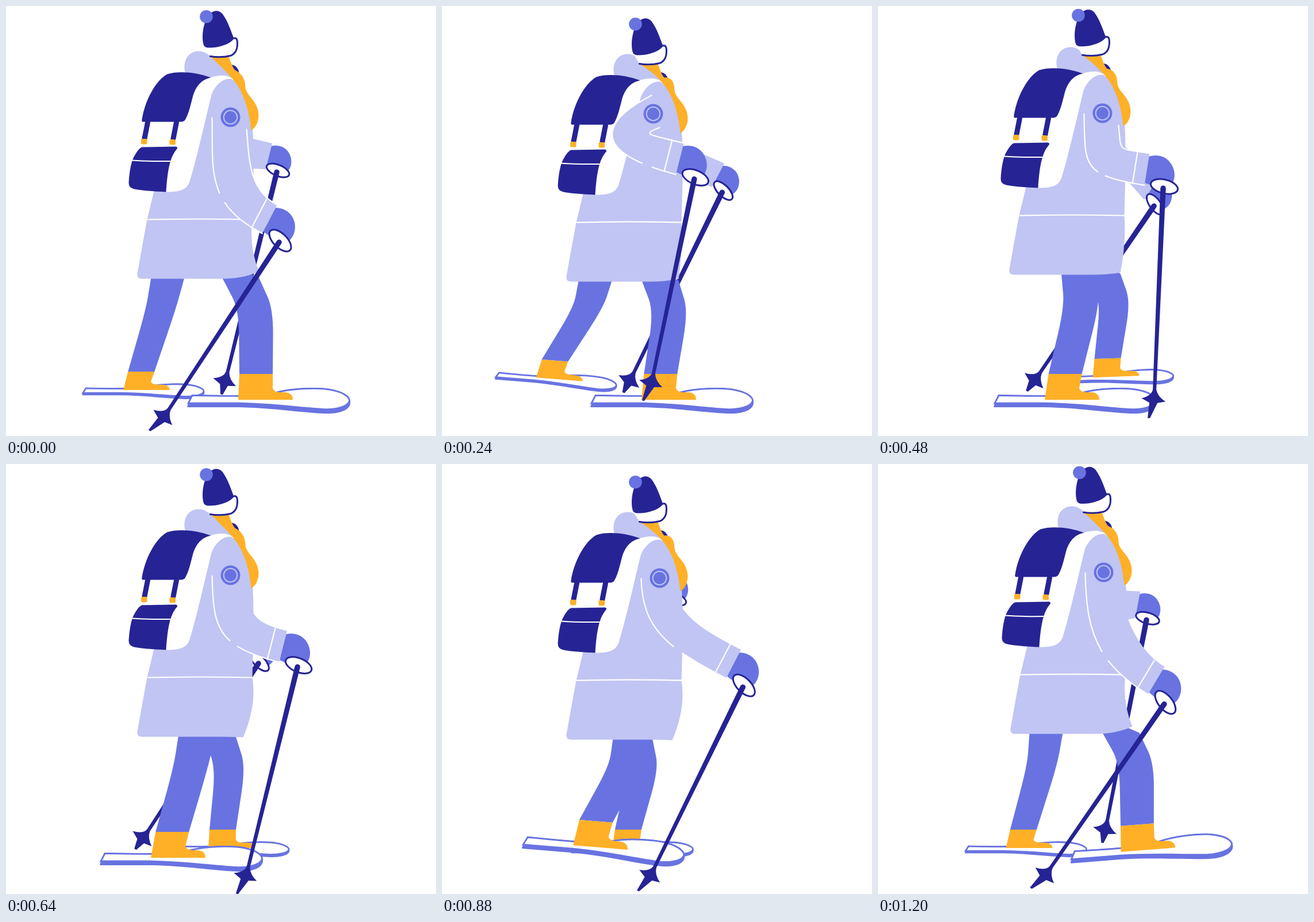
An HTML page for the animation above (1280 ms loop, 748x748 px).

```html
<!DOCTYPE html>
<html lang="en">
<head>
<meta charset="utf-8">
<title>Winter hike</title>
<style>
html, body { margin: 0; width: 100%; height: 100%; overflow: hidden; background: #fff; }
svg { display: block; width: 100vw; height: 100vh; }
</style>
</head>
<body>
<svg id="stage" viewBox="0 0 748 748"></svg>
<script>
const STEP = 80, STEPS = 16, STANCE = 9, SWING = STEPS - STANCE;
const NAVY = '#262494', BLUE = '#6873e1', LILAC = '#c0c5f3', AMBER = '#ffb027', WHITE = '#fff';
const { PI, sin, cos, hypot, max, min } = Math;

// Both sides share one gait, half a cycle apart
const NEAR = {
  phase: 0, heel: [404, 685], stride: 19, kick: 55, hip: [.5, 206], hipW: 32, kneeW: 30,
  ski: '', boot: [58, 45, 95], shift: [0, 0], hand: 1, grip: 33, guard: [24, 12], spike: [-8, 48]
};
const FAR = {
  phase: 8, heel: [352, 668], stride: 18.5, kick: 71, hip: [.6, 159], hipW: 29, kneeW: 26,
  ski: 'translate(-5 1.5) scale(.75 .6)', boot: [46, 32, 81], shift: [-36, -64], hand: .83, grip: 20, guard: [21, 9.5], spike: [-1, 38]
};
// Grip of the pole at every second step
const GRIP = [[475, 411], [428, 328], [460, 288], [496, 317], [507, 353], [519, 378], [525, 397], [516, 412]];

const add = (a, b, f = 1) => [a[0] + b[0] * f, a[1] + b[1] * f];
const mix = (a, b, f) => [a[0] + (b[0] - a[0]) * f, a[1] + (b[1] - a[1]) * f];
const clamp = (v, lo, hi) => max(lo, min(hi, v));
const degrees = (x, y) => Math.atan2(y, x) * 180 / PI;
const polar = deg => [cos(deg * PI / 180), sin(deg * PI / 180)];

const fill = (d, color, extra = '') => `<path d="${d}" fill="${color}" ${extra}/>`;
const line = (d, color, width, extra = '') =>
  `<path d="${d}" fill="none" stroke="${color}" stroke-width="${width}" stroke-linecap="round" stroke-linejoin="round" ${extra}/>`;
const group = (transform, body) => `<g transform="${transform}">${body}</g>`;
const move = (p, body) => group(`translate(${p})`, body);

// Closed Catmull-Rom curve through evenly timed points
function loopCurve(points, t) {
  const n = points.length, i = Math.floor(t), f = t - i;
  const [a, b, c, d] = [-1, 0, 1, 2].map(j => points[(i + j + n) % n]);
  return [0, 1].map(m => b[m] + f / 2 * (c[m] - a[m] +
    f * (2 * a[m] - 5 * b[m] + 4 * c[m] - d[m] + f * (3 * (b[m] - c[m]) + d[m] - a[m]))));
}

function bodyPose(k) {
  const wave = peak => cos((k - peak) * PI / 4);
  const body = [-6.5 - 7 * wave(3), 7 * wave(2) - .5];
  return { body, head: add(body, [0, 4.7 + 4.7 * wave(4)]) };
}

// The foot slides back with the ground, then kicks forward in an arc
function footPose(kind, u) {
  const s = max(0, (u - STANCE) / SWING), lift = sin(PI * s);
  const [x0, y0] = kind.heel;
  const back = STANCE * kind.stride;
  const x = u < STANCE ? x0 - u * kind.stride : x0 - back * (1 - s) - kind.kick * sin(2 * PI * s);
  return {
    x, y: y0 - 30 * lift ** 1.3,
    tilt: 8 * (1 - s / 2) * sin(2 * PI * s ** 1.7),
    lean: 2 + 7 * (u < STANCE ? u / STANCE : 1 - s),
    hip: kind.hip[0] * x + kind.hip[1] + 12 * lift,
    bend: 18 - 15 * max(0, cos((u - 8.5) * PI / 7))
  };
}

// The pole end stays planted while the hand passes, then swings ahead
function polePose(kind, u) {
  const grip = add(loopCurve(GRIP, u / 2), kind.shift);
  const planted = (u + 8) % STEPS;
  let end = [421 - 17.3 * planted, 703];
  if (planted > STANCE) {
    const s = (planted - STANCE) / SWING;
    end = [265 + 156 * s + 140 * sin(PI * s ** 1.2) ** 2, 703 - 62 * sin(PI * s ** .6)];
  }
  const turn = 21 - 12 * cos((u - 5.5) * PI / 8);
  const v = polar(turn);
  const low = add(grip, v, -kind.grip);
  const high = add(low, [v[1], -v[0]], 56 * kind.hand);
  return { grip, end: add(end, kind.shift), turn, v, low, high };
}

const SKI =
  fill('M-89,12L-81,-9C-30,-8 40,-6 66,-14C95,-22 145,-23 165,-18C188,-13 196,-4 195,6C194,18 176,25 150,24C105,22 60,14 0,13L-88,13Z', BLUE) +
  fill('M-87,6L-80,-7.5C-30,-6.5 40,-4.5 67,-12.5C95,-20.5 145,-21.5 164.500,-16.5C186,-12 195,-3 193,3C190,12 170,17 150,16.5C105,14 60,7 0,6Z',
    WHITE, `stroke="${BLUE}" stroke-width="2.800" vector-effect="non-scaling-stroke"`);

function leg(foot, kind, hipY) {
  const { x, y, tilt, lean, hip, bend } = foot;
  const [w, h, len] = kind.boot;
  const [c, s] = polar(tilt);
  const ankle = lx => [x + lx * c + h * s, y + lx * s - h * c];
  const top = [hip, hipY];
  const knee = add(mix(top, ankle(lean + w / 2), .33), [bend, 0]);
  const side = (p, dx) => [p[0] + dx, p[1]];
  const edge = (a, k, b) => `L${a}L${mix(a, k, .6)}Q${k} ${mix(k, b, .4)}L${b}`;
  const trousers = `M${hip},${hipY - 14}` +
    edge(side(top, -kind.hipW), side(knee, -kind.kneeW), ankle(lean)) +
    edge(ankle(lean + w), side(knee, kind.kneeW), side(top, kind.hipW)) + 'Z';
  const q = h / 45;
  const boot = `M0,0L${lean},${-h}H${lean + w}L${w + 2},${-20 * q}Q${w + 4},${-14 * q} ${w + 14},${-13 * q}` +
    `L${len - 12},${-13 * q}Q${len},${-11 * q} ${len},0Z`;
  const at = `translate(${x} ${y}) rotate(${tilt})`;
  return group(at, group(kind.ski, SKI)) + fill(trousers, BLUE) + group(at, fill(boot, AMBER));
}

const glove = (p, kind) => group(`translate(${p.low}) rotate(${p.turn}) scale(${kind.hand})`,
  fill('M0,-4L-1,-50C12,-57 28,-56 38,-46C50,-35 52,-18 46,-8C38,1 20,0 0,-4Z', BLUE));

function pole({ grip, end, turn }, kind) {
  const [dx, dy] = add(end, grip, -1);
  const len = hypot(dx, dy), [px, py] = kind.spike;
  const guard = `<ellipse rx="${kind.guard[0]}" ry="${kind.guard[1]}" fill="#fff" stroke="${NAVY}" stroke-width="3"/>`;
  const shaft = `M-4.7,0A4.7,4.7 0 0 1 4.7,0L3,${len + 4}H-3Z`;
  const star = `M-3,-2Q-5,9 -22,14L-8,21L${px - 2},${py}H${px + 2}L6,21L20,18Q6,10 3,-2Z`;
  return group(`translate(${add(grip, [2, -3])}) rotate(${1.7 * turn - 2})`, guard) +
    group(`translate(${grip}) rotate(${degrees(dx, dy) - 90})`, fill(shaft, NAVY) + move([0, len], fill(star, NAVY)));
}

function farArm(p, body) {
  const sleeve = `M${add([400, 224], body)}L${p.high}L${p.low}L${add([410, 282], body)}Z`;
  return glove(p, FAR) + fill(sleeve, LILAC) + pole(p, FAR);
}

// 0 for an open arm, 1 when the elbow is drawn right back
const foldOf = (p, body) => clamp((445 + body[0] - p.low[0]) / 23, 0, 1);

function nearArm(p, body, fold, u) {
  const a = add(add([360, 195], body), [18, -44], fold);
  const f = add(add([420, 215], body), [-28, -8], fold);
  const back = `M${a}C${add(a, [2 - 96 * fold, 90 - 42 * fold])} ${add(p.low, p.v, -112 - 36 * fold)} ${p.low}`;
  const f1 = add(f, [5 - 40 * fold, 48 - 35 * fold]), f2 = add(p.high, p.v, -58);
  const sleeve = `${back}L${p.high}C${f2} ${f1} ${f}Z`;
  const cuff = `M${add(p.low, p.v, -21)}L${add(p.high, p.v, -21)}`;
  return glove(p, NEAR) + fill(sleeve, LILAC) +
    line(back, WHITE, 2.2, `pathLength="100" stroke-dasharray="${56 + 18 * fold} 8 100"`) +
    (u < 8 ? line(`M${f}C${f1} ${f2} ${p.high}`, WHITE, 2.2) : '') + line(cuff, WHITE, 2.2);
}

// The hem is pushed out by the leading hip
function coat(frontHip) {
  const x = clamp(frontHip, 414, 442), y = 476 - (x - 414) / 2;
  return fill(`M262,310L247,372Q238,420 230,466Q229,475 238,475H375Q${x - 27},475 ${x},${y}` +
    `Q${429 - (x - 432) / 2},420 430,372L432,300C432,235 434,190 416,150C404,130 388,121 372,126L330,150Z`, LILAC) +
    line('M248,372Q340,370 430,372', WHITE, 2.2);
}

const HOOD = fill('M313,116C308,92 322,78 338,79C356,80 372,103 396,126L388,136L330,128Z', LILAC);
const buckle = (x, y) => `<rect x="${x}" y="${y}" width="10.500" height="9.500" rx="2.500" fill="${AMBER}"/>`;
const PACK =
  fill('M330,118L357,125C370,121 386,119 397,128C381,123 365,138 359,155C349,195 335,260 321,306C316,320 305,324 280,324L250,318L246,198Z', WHITE) +
  fill('M238,198C243,165 262,130 282,119C300,113 332,115 358,125C338,129 330,145 326,160C321,180 318,190 314,197Q312,202 305,202H241Q237,202 238,198Z', NAVY) +
  line('M248,203L242.5,231M298,203L292.5,231', NAVY, 9) +
  buckle(236.5, 231.5) + buckle(286, 232.5) +
  fill('M238,246L297,245Q301,246 299,249C288,262 283,280 280,324C255,323 235,321 225,319Q215,317 215,308C216,290 219,272 224,263Q232,248 238,246Z', NAVY) +
  line('M221,269Q250,271 287,270.500', WHITE, 2);
const BADGE = `<circle r="17" fill="${BLUE}"/><circle r="11.700" fill="none" stroke="${LILAC}" stroke-width="2"/>`;
const COLLAR = fill('M388,102Q405,102 407,117L396,116Z', NAVY);
const HAT =
  fill('M347,72C372,76 390,68 397,57Q404,54 404,65C405,78 400,84 392,87Q375,91 357,88Z', WHITE) +
  line('M397,57Q404,53.500 404,66C404,78 400,84 392,87Q375,91 357,88', NAVY, 3) +
  fill('M345,67C341,50 346,25 356,14Q368,4 378,14C388,28 392,42 398,57C392,67 370,74 352,73Q346,72 345,67Z', NAVY) +
  `<circle cx="350" cy="19" r="11.300" fill="${BLUE}"/>`;

// The face end follows the head, the rest hangs on the body
function scarf(nod) {
  const up = (x, y) => add([x, y], nod);
  return fill(`M${up(357, 86)}L${up(388, 86)}C${up(392, 95)} ${up(394, 105)} ${up(400, 112)}` +
    'C413,118 418,130 418,142C420,158 440,165 441,190C441,205 434,213 428,217' +
    `C426,190 418,160 405,140C398,128 380,110 ${up(357, 88)}Z`, AMBER);
}

function scene(k) {
  const { body, head } = bodyPose(k);
  const u = kind => (k + kind.phase) % STEPS;
  const nearFoot = footPose(NEAR, u(NEAR)), farFoot = footPose(FAR, u(FAR));
  const nearPole = polePose(NEAR, u(NEAR)), farPole = polePose(FAR, u(FAR));
  const frontHip = max(nearFoot.hip + NEAR.hipW, farFoot.hip + FAR.hipW) - body[0];
  const hipY = 473 + body[1];
  const fold = foldOf(nearPole, body);
  return farArm(farPole, body) +
    leg(farFoot, FAR, hipY) +
    leg(nearFoot, NEAR, hipY) +
    move(body, coat(frontHip) + HOOD + PACK) +
    nearArm(nearPole, body, fold, u(NEAR)) +
    move(head, COLLAR) +
    move(body, scarf(add(head, body, -1)) + move([392 - 11 * fold, 194 - 11 * fold], BADGE)) +
    move(head, HAT) +
    pole(nearPole, NEAR);
}

const stage = document.getElementById('stage');
let shown = -1;
function draw() {
  const k = Math.floor(performance.now() / STEP) % STEPS;
  if (k !== shown) stage.innerHTML = scene(shown = k);
  requestAnimationFrame(draw);
}
draw();
</script>
</body>
</html>
```
